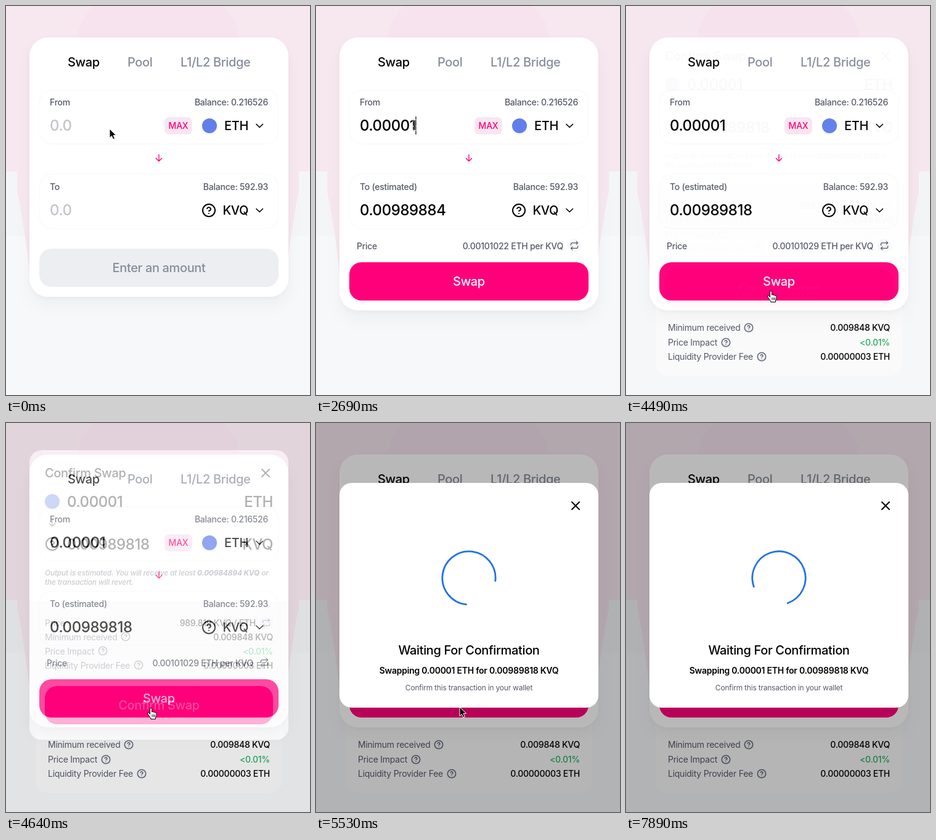
Write an HTML page that moves like this. It is 493 px wide and 630 px high and loops after 8 s.

```html
<!DOCTYPE html>
<html lang="en">
<head>
<meta charset="utf-8">
<title>Token swap</title>
<style>
  html, body { margin: 0; width: 493px; height: 630px; overflow: hidden; background: #f7f8fa; }
  svg { display: block; }
  text { font-family: Inter, "Liberation Sans", sans-serif; font-weight: 500; letter-spacing: -.018em; white-space: pre; }
  .line { fill: none; stroke-linecap: round; stroke-linejoin: round; }
  #card { filter: drop-shadow(0 3px 4px rgba(0,0,0,.03)) drop-shadow(0 14px 12px rgba(0,0,0,.035)); }
</style>
</head>
<body>
<svg id="stage" width="493" height="630" viewBox="0 0 493 630"></svg>
<script>
const LOOP = 8000, TOKEN = 'KVQ';
const PINK = '#ff007a', HOVER = '#e6006f', GREY = '#565a69', MUTED = '#888d9b', GREEN = '#27ae60';

// Drawing helpers
const text = (x, y, size, fill, str, anchor = 'start', extra = '') =>
  `<text x="${x}" y="${y}" font-size="${size}" fill="${fill}" text-anchor="${anchor}" ${extra}>${str}</text>`;
const rect = (x, y, w, h, r, fill, extra = '') =>
  `<rect x="${x}" y="${y}" width="${w}" height="${h}" rx="${r}" fill="${fill}" ${extra}/>`;
const line = (d, color, width, extra = '') =>
  `<path class="line" d="${d}" stroke="${color}" stroke-width="${width}" ${extra}/>`;
const group = (id, body, extra = '') => `<g id="${id}" ${extra}>${body}</g>`;
const dot = (x, y) =>
  `<circle cx="${x}" cy="${y + 2}" r="13" fill="#f6f7f9"/><circle cx="${x}" cy="${y}" r="12" fill="#627eea"/>`;

// Icons on a 24-unit grid, centred on x, y
const icon = (x, y, size, color, body, width = 2) =>
  `<g class="line" transform="translate(${x - size / 2} ${y - size / 2}) scale(${size / 24})"
    stroke="${color}" stroke-width="${width}">${body}</g>`;
const help = (x, y, size, color) => icon(x, y, size, color,
  '<circle cx="12" cy="12" r="10"/><path d="M9.1 9a3 3 0 0 1 5.8 1c0 2-2.9 3-2.9 3M12 17h.01"/>');
const tip = (x, y) => `<circle cx="${x}" cy="${y}" r="9" fill="#f2f3f6"/>` + help(x, y, 16, GREY);
const flip = (x, y, bg) => `<circle cx="${x}" cy="${y}" r="11" fill="${bg}"/>` + icon(x, y, 15, GREY,
  '<path d="M17 1l4 4-4 4M3 11V9a4 4 0 0 1 4-4h14M7 23l-4-4 4-4M21 13v2a4 4 0 0 1-4 4H3"/>');
const down = (x, y, color) => icon(x, y, 16, color, '<path d="M12 4v16M19 13l-7 7-7-7"/>');
const close = y => icon(421, y, 24, '#000', '<path d="M18 6L6 18M6 6l12 12"/>');
const chevron = y => line(`M406 ${y - 2.5}l5.2 5 5.2-5`, '#000', 1.7);

const button = (id, x, y, w, label, fill = PINK, ink = '#fff') =>
  rect(x, y, w, 62, 20, fill, `id="${id}"`) + text(248, y + 38, 20, ink, label, 'middle');

// Minimum, impact and fee rows
const rows = (left, right, ys, tipGap) =>
  [['Minimum received', `0.009848 ${TOKEN}`, '#000', 131],
   ['Price Impact', '&lt;0.01%', GREEN, 94],
   ['Liquidity Provider Fee', '0.00000003 ETH', '#000', 152]].map(([name, value, ink, gap], i) =>
    text(left, ys[i], 14, GREY, name, 'start', 'font-weight="400" style="font-weight:400"') +
    tip(left + gap, ys[i] - tipGap) +
    text(right, ys[i], 14, ink, value, 'end')).join('');

const panel = y => rect(54.5, y + .5, 387, 88, 20, '#fff', 'stroke="#f7f8fa"');

const pinkLeft = 'L475 268L475 300L469 330L461 380L455 430H38L32 380L24 330L18 300L18 268';
const backdrop =
  rect(0, 0, 493, 630, 0, '#f7f8fa') +
  rect(0, 268, 493, 104, 0, '#f4f5f7') +
  `<path d="M0 0H493V268${pinkLeft}H0Z" fill="#f7e7ef"/>` +
  '<ellipse cx="247" cy="58" rx="132" ry="95" fill="#f7e3ee"/>' +
  rect(0, 267, 18, 20, 0, '#f7e7ef', 'class="edge"') + rect(475, 267, 18, 20, 0, '#f7e7ef', 'class="edge"');

const details = group('details',
  rect(48, 470, 400, 129, 20, '#fbfbfc') + rows(68, 428, [526, 550, 573], 5));

const card =
  rect(38, 51, 420, 420, 30, '#fff', 'id="card"') +
  text(100, 98, 20, '#000', 'Swap') + text(197, 98, 20, MUTED, 'Pool') + text(283, 98, 20, MUTED, 'L1/L2 Bridge') +
  panel(135) + text(71, 161, 14, GREY, 'From') + text(425, 161, 14, GREY, 'Balance: 0.216526', 'end') +
  text(71, 202, 24, '#000', '', 'start', 'id="amount"') +
  rect(257, 180, 45, 28, 8, '#f9e6f0') + text(279.5, 199, 14, PINK, 'MAX', 'middle') +
  dot(330, 194) + text(393, 201, 20, '#000', 'ETH', 'end') + chevron(194) +
  down(248, 246, PINK) +
  panel(272) + text(71, 298, 14, GREY, 'To', 'start', 'id="toLabel"') +
  text(425, 298, 14, GREY, 'Balance: 592.93', 'end') +
  text(71, 339, 24, '#000', '', 'start', 'id="output"') +
  help(329, 331, 24, '#000') + text(393, 338, 20, '#000', TOKEN, 'end') + chevron(331) +
  group('idle', button('enter', 54, 393, 388, 'Enter an amount', '#edeef2', MUTED)) +
  group('ready', text(66, 394, 14, GREY, 'Price') + text(401, 394, 14, GREY, '', 'end', 'id="price"') +
    flip(419, 388, '#f7f8fa') + button('swap', 54, 415, 388, 'Swap')) +
  rect(71, 179, 1.2, 29, 0, '#000', 'id="caret"');

const note = 'font-style="italic"';
const confirmBox = group('confirm',
  rect(38, 44, 420, 469, 20, '#fff') +
  '<path d="M38 289H458V493a20 20 0 0 1-20 20H58a20 20 0 0 1-20-20Z" fill="#f7f8fa"/>' +
  text(63, 88, 20, '#000', 'Confirm Swap') + close(81) +
  dot(75, 127) + text(99, 136, 24, '#000', '0.00001') + text(433, 136, 24, '#000', 'ETH', 'end') +
  down(75, 162, GREY) +
  help(75, 196, 24, '#000') + text(99, 205, 24, '#000', '0.00989818') + text(433, 205, 24, '#000', TOKEN, 'end') +
  text(63, 247, 12, GREY, 'Output is estimated. You will receive at least ' +
    `<tspan style="font-weight:700">0.00984894 ${TOKEN}</tspan> or`, 'start', note) +
  text(63, 262, 12, GREY, 'the transaction will revert.', 'start', note) +
  text(63, 329, 14, GREY, 'Price', 'start', 'style="font-weight:400"') +
  text(405, 329, 14, '#000', `989.819 ${TOKEN} / ETH`, 'end') + flip(422, 324, '#edeef2') +
  rows(63, 433, [352, 375, 398], 6) +
  button('accept', 63, 426, 370, 'Confirm Swap'));

const waitBox = group('wait',
  rect(38, 97, 420, 364, 20, '#fff') + close(134) +
  line('M43.1 0A43.1 43.1 0 1 0 0 43.1', '#2172e5', 2.8, 'id="spinner"') +
  text(248, 375, 20, '#000', 'Waiting For Confirmation', 'middle') +
  text(248, 406, 14, '#000', `Swapping 0.00001 ETH for 0.00989818 ${TOKEN}`, 'middle', 'style="font-weight:600"') +
  text(248, 433, 12, GREY, 'Confirm this transaction in your wallet', 'middle', 'style="font-weight:400"'));

// Each pointer has its hot spot at 0, 0
const pointers =
  group('arrow', '<path d="M0 0V14.6L3.4 11.4 5.8 17 8.4 15.9 6 10.4H10.6Z" fill="#000" stroke="#fff"/>') +
  group('beam', line('M-2.5 -8Q0 -8 0 -6V6Q0 8 -2.5 8M2.5 -8Q0 -8 0 -6V6Q0 8 2.5 8M-1.5 2H1.5', '#fff', 2.4) +
    line('M-2.5 -8Q0 -8 0 -6V6Q0 8 -2.5 8M2.5 -8Q0 -8 0 -6V6Q0 8 2.5 8M-1.5 2H1.5', '#000', 1)) +
  group('hand', '<path d="M-1.5 1Q-1.5 -.5 0 -.5T1.6 1V6.2Q2 5.2 3.2 5.4T4.4 6.6Q5 5.8 6 6.2T7 7.4Q7.6 6.8 8.4 7.2T9 8.6V12Q8.6 14 7.6 15V17.5H-.2V16Q-1.6 14.6-3.2 12L-5.4 9Q-6 7.6-4.8 7.2T-2.6 8.2L-1.5 9.4Z" fill="#fff" stroke="#000"/>' +
    line('M2 10.5V14M4.3 10.5V14M6.5 10.5V14', '#000', .9));

stage.innerHTML = backdrop + details + card +
  group('modal', rect(0, 0, 493, 630, 0, '#000', 'opacity=".28"') + confirmBox + waitBox) + pointers;

// Each step changes part of the state and holds until the next
const start = { amount: '', caret: 0, ptr: 'arrow', at: [168, 199], quote: 0, slide: -110, swap: PINK, accept: PINK, fade: 0, wait: false };
const steps = [
  [140, { at: [163, 196] }],
  [290, { ptr: 'beam', at: [160, 193] }],
  [440, { caret: 1 }],
  [890, { caret: 0 }],
  [1340, { caret: 1, amount: '0' }],
  [1490, { amount: '0.' }],
  [1640, { amount: '0.0' }],
  [1790, { amount: '0.00' }],
  [1940, { amount: '0.000' }],
  [2390, { amount: '0.0000' }],
  [2690, { amount: '0.00001', quote: 1 }],
  [2840, { slide: -55 }],
  [2990, { slide: 0 }],
  [3140, { caret: 0 }],
  [3590, { caret: 1, quote: 2, ptr: 'arrow', at: [172, 240] }],
  [3740, { at: [190, 330] }],
  [3890, { at: [203, 400] }],
  [4040, { ptr: 'hand', at: [225, 445], swap: HOVER }],
  [4190, { at: [235, 462], caret: 0 }],
  [4490, { fade: .02, swap: PINK }],
  [4640, { fade: .3 }],
  [4790, { fade: 1 }],
  [4930, { accept: HOVER }],
  [5530, { wait: true, ptr: 'arrow', at: [233, 460] }],
  [5680, { at: [235, 478] }],
  [5830, { at: [238, 500] }],
  [5980, { ptr: '' }]
];
const quotes = [['0.0', ''], ['0.00989884', '0.00101022'], ['0.00989818', '0.00101029']];

const $ = id => document.getElementById(id);
const show = (id, on) => $(id).setAttribute('display', on ? 'inline' : 'none');
const put = (id, str, fill) => {
  if ($(id).textContent !== str) $(id).textContent = str;
  if (fill) $(id).setAttribute('fill', fill);
};

function render(t) {
  const s = Object.assign({}, start, ...steps.filter(([at]) => at <= t).map(([, change]) => change));
  const ready = s.quote > 0, [out, price] = quotes[s.quote];
  const faint = '#c3c5cb';

  put('amount', s.amount || '0.0', s.amount ? '#000' : faint);
  put('output', out, ready ? '#000' : faint);
  put('toLabel', ready ? 'To (estimated)' : 'To');
  put('price', `${price} ETH per ${TOKEN}`);
  show('idle', !ready);
  show('ready', ready);
  show('details', ready);
  $('card').setAttribute('height', ready ? 442 : 420);
  $('details').setAttribute('transform', `translate(0 ${s.slide})`);
  $('swap').setAttribute('fill', s.swap);
  $('accept').setAttribute('fill', s.accept);

  show('caret', s.caret);
  $('caret').setAttribute('x', 71 + (s.amount ? $('amount').getComputedTextLength() : 0));

  show('modal', s.fade);
  $('modal').setAttribute('opacity', s.fade);
  show('confirm', !s.wait);
  show('wait', s.wait);
  for (const e of document.querySelectorAll('.edge')) e.setAttribute('opacity', s.fade > .1 ? 1 : 0);

  const tick = 147.5, turn = 6 + .18 * tick * Math.floor((t - 5530) / tick + 1e-6);
  $('spinner').setAttribute('transform', `translate(248 251) rotate(${turn})`);

  for (const id of ['arrow', 'beam', 'hand']) {
    show(id, s.ptr === id);
    $(id).setAttribute('transform', `translate(${s.at})`);
  }
}

const t0 = performance.now();
function frame() {
  render((performance.now() - t0) % LOOP);
  requestAnimationFrame(frame);
}
frame();
</script>
</body>
</html>
```
